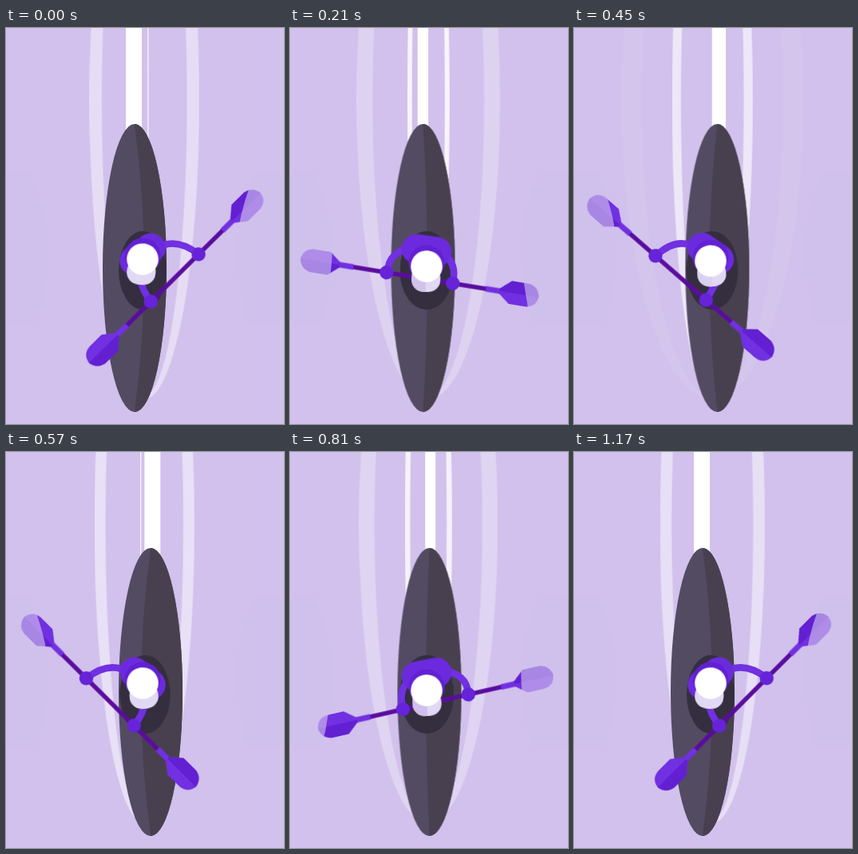
An HTML page without scripts that plays this animation: 348 by 495 pixels, repeating every 1200 ms.

```html
<!DOCTYPE html>
<html lang="en">
<head>
<meta charset="utf-8">
<title>Kayak</title>
<style>
  html, body { margin: 0; width: 100%; height: 100%; overflow: hidden; background: #d1c1ec; }
  svg { display: block; width: 348px; height: 495px; }

  :root {
    --out: cubic-bezier(.333, .667, .667, 1);
    --sway: cubic-bezier(.45, 0, .55, 1);
    /* arm poses, from fully stretched to fully pulled in */
    --arm0: path("M188 276Q212 260 241.2 282.6");
    --arm1: path("M188 275Q214 260 239.6 284.7");
    --arm2: path("M188 272Q220 262 234.6 291.1");
    --arm3: path("M186 272Q222 276 223.2 303.3");
    --arm4: path("M190 282Q208 296 200.3 321.7");
    --arm5: path("M190 292Q192 312 179.2 333.9");
    --arm6: path("M184 305Q176 322 164.8 340.3");
    --arm7: path("M174 312Q172 328 159.7 342.2");
  }

  .wake, .trail, .boat, .shade, .cockpit, .paddle, .arm, .bob, .twist, .tilt, .cheek {
    animation: 1200ms linear infinite;
  }

  .wake { animation-name: wake; fill: #fff; fill-rule: evenodd; }
  .late { animation-delay: -630ms; }
  @keyframes wake {
    0% { transform: translate(173.2px, 90px) scaleX(.042); opacity: 1; }
    97.5%, 100% { transform: translate(173.2px, 90px) scaleX(1); opacity: 0; }
  }

  .trail { animation-name: drift; animation-timing-function: var(--sway); }
  @keyframes drift {
    0%, 97.5%, 100% { transform: translateX(160px); }
    47.5% { transform: translateX(183.3px); }
  }
  .trail rect { animation: thin 1200ms var(--sway) infinite; }
  @keyframes thin {
    0%, 47.5%, 97.5%, 100% { transform: scaleX(1); }
    23.75%, 72.5% { transform: scaleX(.62); }
  }

  .boat { animation-name: boat; animation-timing-function: var(--sway); }
  @keyframes boat {
    0%, 97.5%, 100% { transform: translate(161px, 300px); }
    47.5% { transform: translate(181px, 300px); }
  }
  .shade { animation-name: roll; animation-timing-function: var(--sway); }
  @keyframes roll {
    0%, 97.5%, 100% { d: path("M0 -180Q24 0 0 180A40 180 0 0 0 0 -180Z"); }
    47.5% { d: path("M0 -180Q-24 0 0 180A40 180 0 0 0 0 -180Z"); }
  }
  .cockpit { animation-name: cockpit; animation-timing-function: var(--sway); }
  @keyframes cockpit {
    0%, 97.5%, 100% { transform: translate(171px, 303px) scaleX(.88); }
    23.75%, 72.5% { transform: translate(171px, 303px); }
    47.5% { transform: translate(174px, 303px) scaleX(.93); }
  }

  .paddle { animation-name: paddle; animation-timing-function: var(--out); }
  @keyframes paddle {
    0%, 97.5%, 100% { transform: translate(211.5px, 312.4px) rotate(-45deg); }
    47.5% { transform: translate(130px, 312.4px) rotate(45deg); }
  }

  .arm { fill: none; stroke: #7130e1; stroke-width: 8.5; }
  .right { animation-name: pull; }
  .left { animation-name: reach; }
  @keyframes pull {
    0%, 97.5%, 100% { d: var(--arm0); }
    9.5% { d: var(--arm3); }
    19% { d: var(--arm4); }
    28.5% { d: var(--arm5); }
    38% { d: var(--arm6); }
    47.5% { d: var(--arm7); }
    57.5% { d: var(--arm4); }
    67.5% { d: var(--arm3); }
    77.5% { d: var(--arm2); }
    87.5% { d: var(--arm1); }
  }
  @keyframes reach {
    0%, 97.5%, 100% { d: var(--arm7); }
    9.5% { d: var(--arm4); }
    19% { d: var(--arm3); }
    28.5% { d: var(--arm2); }
    38% { d: var(--arm1); }
    47.5% { d: var(--arm0); }
    57.5% { d: var(--arm3); }
    67.5% { d: var(--arm4); }
    77.5% { d: var(--arm5); }
    87.5% { d: var(--arm6); }
  }

  .bob { animation-name: bob; animation-timing-function: var(--sway); }
  @keyframes bob {
    0%, 47.5%, 97.5%, 100% { transform: none; }
    19%, 67.5% { transform: translateY(var(--rise)); }
  }
  .twist { animation-name: twist; animation-timing-function: var(--out); }
  @keyframes twist {
    0%, 97.5%, 100% { transform: translate(171px, 283px) rotate(-38deg); }
    47.5% { transform: translate(171px, 283px) rotate(38deg); }
  }
  .tilt { animation-name: tilt; animation-timing-function: var(--sway); }
  @keyframes tilt {
    0%, 97.5%, 100% { transform: translate(171px, 289px) rotate(6deg); }
    47.5% { transform: translate(171px, 289px) rotate(-6deg); }
  }
  .cheek { animation-name: cheek; }
  @keyframes cheek {
    0%, 47.5%, 97.5%, 100% { opacity: 0; }
    19%, 67.5% { opacity: 1; }
  }
</style>
</head>
<body>
<svg viewBox="0 0 348 495">
  <defs>
    <path id="ripple" d="M-123 0A123 374 0 0 0 123 0A123 374 0 0 0 -123 0ZM-95.5 0A95.5 370 0 0 0 95.5 0A95.5 370 0 0 0 -95.5 0Z"/>
    <g id="blade">
      <path d="M84 0H104" stroke="#7130e1" stroke-width="7"/>
      <path d="M101 -3L115 -15H136Q149 -13 151 0Q149 13 136 14H115L101 3Z" fill="#7130e1"/>
      <path d="M101 -3L115 -15H136Q149 -13 151 0H101Z" fill="#6220d2"/>
      <circle cx="42" r="8.4" fill="#6623d8"/>
    </g>
    <path id="haze" d="M312 180L306 196C282 262 288 290 298 350L304 370H348V180Z" fill="#d1c1ec" opacity=".64"/>
  </defs>

  <rect width="348" height="495" fill="#d1c1ec"/>
  <use href="#ripple" class="wake"/>
  <use href="#ripple" class="wake late"/>
  <g class="trail"><rect x="-10" width="20" height="300" fill="#fff"/></g>

  <g class="boat">
    <ellipse rx="40" ry="180" fill="#534b62"/>
    <path class="shade" fill="#48404f" d="M0 -180Q24 0 0 180A40 180 0 0 0 0 -180Z"/>
  </g>
  <ellipse class="cockpit" rx="34" ry="49" fill="#342e3f"/>

  <g class="paddle">
    <path d="M-88 0H88" stroke="#5a0c9e" stroke-width="5.5"/>
    <use href="#blade"/>
    <use href="#blade" transform="rotate(180)"/>
  </g>

  <!-- the water on both sides veils the blade tips -->
  <use href="#haze"/>
  <use href="#haze" transform="matrix(-1 0 0 1 342 0)"/>

  <path class="arm right" d="M188 276Q212 260 241.2 282.6"/>
  <g transform="matrix(-1 0 0 1 342 0)">
    <path class="arm left" d="M174 312Q172 328 159.7 342.2"/>
  </g>
  <g class="paddle" fill="#6623d8">
    <circle cx="42" r="8.4"/>
    <circle cx="-42" r="8.4"/>
  </g>

  <g class="bob" style="--rise: -5px">
    <path class="twist" d="M-13 0H13" stroke="#6c2ade" stroke-width="37" stroke-linecap="round"/>
  </g>
  <g class="bob" style="--rise: 9px">
    <circle cx="171" cy="285" r="22.5" fill="#6220d2"/>
    <g class="tilt">
      <rect x="-18" width="36" height="32" rx="15" fill="#e1d8f3"/>
      <path class="cheek" d="M0 0H-18V17A15 15 0 0 0 -3 32H0Z" fill="#d0c1ea"/>
      <circle r="19.8" fill="#fff"/>
    </g>
  </g>
</svg>
</body>
</html>
```
